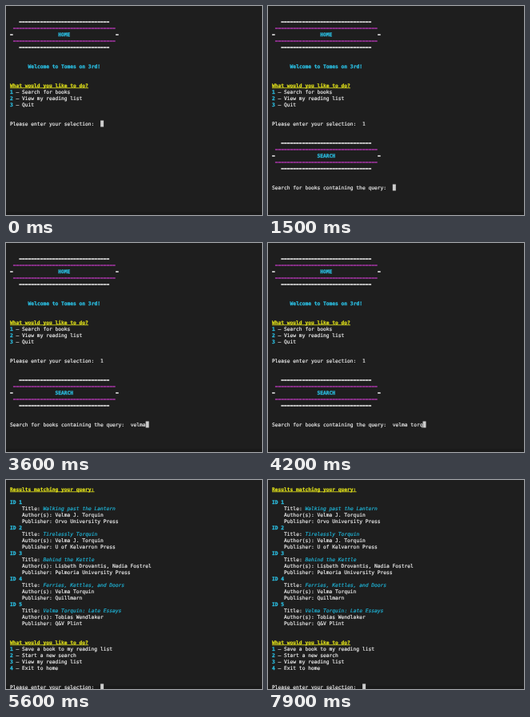
Recreate the animation shown at these times as an HTML page. Size 320 by 262 pixels, loop 8000 ms.

```html
<!DOCTYPE html>
<html lang="en">
<head>
<meta charset="utf-8">
<title>Reading list terminal</title>
<style>
  html, body { margin: 0; width: 100%; height: 100%; overflow: hidden; background: #1e1e1e; }
  svg { display: block; width: 100%; height: 100%; }
  text {
    font-family: "DejaVu Sans Mono", monospace;
    font-size: 6.262px;
    white-space: pre;
    text-rendering: geometricPrecision;
    color: #ececec;
    fill: currentColor;
    stroke: currentColor;
    stroke-width: 0.2px;
  }
  .cyan { color: #2bbde0; font-weight: bold; stroke-width: 0.28px; }
  .title { color: #1fb0d2; font-style: italic; }
  .magenta { color: #a836a8; }
  .yellow { color: #e5e51a; fill: currentColor; font-weight: bold; }
</style>
</head>
<body>
<svg id="stage" viewBox="0 0 320 262" xmlns="http://www.w3.org/2000/svg"></svg>
<script>
const LOOP = 8000, LEFT = 5, COL = 3.77, ROW = 8, TOP = 7.5;
const stage = document.getElementById('stage');

function add(parent, tag, attrs = {}, content = '') {
  const node = document.createElementNS('http://www.w3.org/2000/svg', tag);
  for (const key in attrs) node.setAttribute(key, attrs[key]);
  node.textContent = content;
  parent.appendChild(node);
  return node;
}

const colX = col => LEFT + col * COL;
const rowY = row => TOP + row * ROW;

function write(parent, row, col, content, style = '') {
  return add(parent, 'text', { x: colX(col), y: rowY(row) + 6.05, class: style }, content);
}

function heading(parent, row, content) {
  write(parent, row, 0, content, 'yellow');
  add(parent, 'rect', {
    x: LEFT, y: rowY(row) + 6.9, width: content.length * COL, height: 0.8, class: 'yellow'
  });
}

function banner(parent, row, name) {
  for (const offset of [0, 4]) write(parent, row + offset, 3, '='.repeat(30));
  for (const offset of [1, 3]) write(parent, row + offset, 1, '='.repeat(34), 'magenta');
  for (const col of [0, 35]) write(parent, row + 2, col, '=');
  write(parent, row + 2, 18 - name.length / 2, name, 'cyan');
}

function menu(parent, row, options) {
  heading(parent, row, 'What would you like to do?');
  options.forEach((option, i) => {
    write(parent, row + 1 + i, 0, String(i + 1), 'cyan');
    write(parent, row + 1 + i, 2, '– ' + option);
  });
}

add(stage, 'rect', { width: 320, height: 262, fill: '#1e1e1e' });
add(stage, 'rect', { y: 258, width: 320, height: 4, fill: '#1a1a1a' });
const home = add(stage, 'g');
const search = add(stage, 'g');
const results = add(stage, 'g');
const cursor = add(stage, 'rect', { width: 4, height: ROW, fill: '#cccccc' });

banner(home, 1, 'HOME');
write(home, 8, 6, 'Welcome to Tomes on 3rd!', 'cyan');
menu(home, 11, ['Search for books', 'View my reading list', 'Quit']);
write(home, 17, 0, 'Please enter your selection:');
const choice = write(home, 17, 30, '1');

banner(search, 20, 'SEARCH');
write(search, 27, 0, 'Search for books containing the query:');
const query = write(search, 27, 40, '');

const books = [
  ['Walking past the Lantern', 'Velma J. Torquin', 'Orvo University Press'],
  ['Tirelessly Torquin', 'Velma J. Torquin', 'U of Kelvarron Press'],
  ['Behind the Kettle', 'Lisbeth Drovantis, Nadia Fostrel', 'Pelmoria University Press'],
  ['Ferries, Kettles, and Doors', 'Velma Torquin', 'Quillmarn'],
  ['Velma Torquin: Late Essays', 'Tobias Wendlaker', 'Q&V Plint']
];
heading(results, 0, 'Results matching your query:');
books.forEach(([title, authors, publisher], i) => {
  const row = 2 + i * 4;
  write(results, row, 0, 'ID ' + (i + 1), 'cyan');
  write(results, row + 1, 4, 'Title:');
  write(results, row + 1, 11, title, 'title');
  write(results, row + 2, 4, 'Author(s): ' + authors);
  write(results, row + 3, 4, 'Publisher: ' + publisher);
});
menu(results, 24, ['Save a book to my reading list', 'Start a new search', 'View my reading list', 'Exit to home']);
write(results, 31, 0, 'Please enter your selection:');

const QUERY = 'velma torquin';
const KEY_TIMES = [3000, 3200, 3300, 3400, 3500, 3700, 3900, 4000, 4100, 4200, 4500, 4600, 4700];
const CHOICE_AT = 1000, SEARCH_AT = 1400, ENTER_AT = 4900, RESULTS_AT = 5600;

const show = (node, visible) => node.setAttribute('visibility', visible ? 'inherit' : 'hidden');

function cursorCell(t, typed) {
  if (t >= RESULTS_AT) return [31, 30];
  if (t >= ENTER_AT) return [28, 0];
  if (t >= SEARCH_AT) return [27, 40 + typed];
  return [17, t >= CHOICE_AT ? 31 : 30];
}

function render(t) {
  const typed = KEY_TIMES.filter(time => time <= t).length;
  show(home, t < RESULTS_AT);
  show(search, t >= SEARCH_AT && t < RESULTS_AT);
  show(results, t >= RESULTS_AT);
  show(choice, t >= CHOICE_AT && t < RESULTS_AT);
  query.textContent = QUERY.slice(0, typed);
  const [row, col] = cursorCell(t, typed);
  cursor.setAttribute('x', colX(col));
  cursor.setAttribute('y', rowY(row));
}

const start = performance.now();
function tick() {
  render((performance.now() - start) % LOOP);
  requestAnimationFrame(tick);
}
render(0);
requestAnimationFrame(tick);
</script>
</body>
</html>
```
